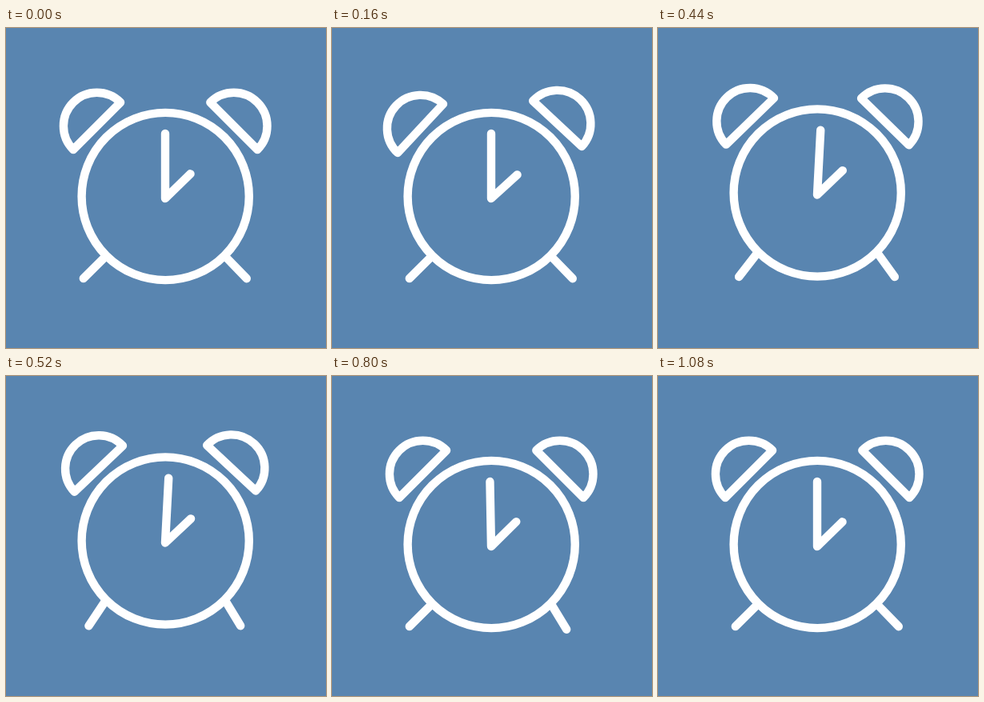
An HTML page with a canvas that plays this animation: 400 by 400 pixels, repeating every 1.16 s.

```html
<!DOCTYPE html>
<html lang="en">
<head>
<meta charset="utf-8">
<title>Alarm clock</title>
<style>
  html, body { margin: 0; width: 100%; height: 100%; overflow: hidden; background: #5985b0; }
  canvas { display: block; width: 100vmin; height: 100vmin; }
</style>
</head>
<body>
<canvas id="stage" width="400" height="400"></canvas>
<script>
const ctx = document.getElementById("stage").getContext("2d");
const LOOP = 1160, STEP = 40, LAST = 27;
const CX = 199.2, CY = 210.5, RADIUS = 104.6, HOP = -4.5;

// Poses of each part at these steps; angles in degrees
const KEYS = [0, 4, 8, 13, 17, 23, LAST];
const POSES = {
  leftBell: [0, -2, 0, 1.4, 0, 0, 0],
  rightBell: [0, -2, 2, -2, 2, -2, 0],
  hour: [0, 2, -0.4, 1, -0.5, -0.4, 0],
  minuteLow: [0, 0, -0.5, -1, -1.5, -0.7, 0],
  leftLeg: [0, 0, 0, 1, 1, -1, 0],
  rightLeg: [0, 0, 0, 1, 1, 1, 0]
};

const rad = deg => deg * Math.PI / 180;
const mix = (a, b, k) => a + (b - a) * k;

function pose(name, step) {
  let i = 0;
  while (i < KEYS.length - 2 && step >= KEYS[i + 1]) i++;
  const k = (step - KEYS[i]) / (KEYS[i + 1] - KEYS[i]);
  const ease = (1 - Math.cos(Math.PI * k)) / 2;
  return mix(POSES[name][i], POSES[name][i + 1], ease);
}

function bell(side, angle) {
  ctx.save();
  ctx.translate(CX, CY);
  ctx.rotate(rad(angle));
  ctx.scale(side, 1);
  ctx.beginPath();
  ctx.arc(85.6, -88, 41.7, rad(-135), rad(45));
  ctx.closePath();
  ctx.stroke();
  ctx.restore();
}

function leg(x, y, rest, inner, outer, swing) {
  const end = swing < 0 ? outer : inner;
  const k = Math.abs(swing);
  ctx.beginPath();
  ctx.moveTo(x, y);
  ctx.lineTo(mix(rest[0], end[0], k), mix(rest[1], end[1], k));
  ctx.stroke();
}

function hands(minute, hour) {
  const x = 199, y = 213;
  const m = rad(minute), h = rad(45.8 + hour);
  ctx.beginPath();
  ctx.moveTo(x + 81 * Math.sin(m), y - 81 * Math.cos(m));
  ctx.lineTo(x, y);
  ctx.lineTo(x + 44 * Math.sin(h), y - 44 * Math.cos(h));
  ctx.stroke();
}

function draw(ms) {
  const step = Math.min(LAST, Math.floor((ms % LOOP) / STEP));
  // The case rattles 30 times a second
  const up = Math.floor(step * 6 / 5) % 2 === 1;
  const at = name => pose(name, step);

  ctx.fillStyle = "#5985b0";
  ctx.fillRect(0, 0, 400, 400);
  ctx.strokeStyle = "#fff";
  ctx.lineWidth = 10.4;
  ctx.lineCap = ctx.lineJoin = "round";

  ctx.save();
  ctx.translate(0, up ? HOP : 0);
  bell(-1, at("leftBell"));
  bell(1, at("rightBell"));
  leg(124, 286, [96.8, 313], [103.4, 316.8], [95, 301.5], at("leftLeg"));
  leg(274.5, 286, [300.8, 313.2], [293.2, 316.8], [303.4, 301.5], at("rightLeg"));
  ctx.beginPath();
  ctx.arc(CX, CY, RADIUS, 0, 2 * Math.PI);
  ctx.stroke();
  hands(up ? 3 : at("minuteLow"), at("hour"));
  ctx.restore();
}

const start = performance.now();
function tick() {
  draw(performance.now() - start);
  requestAnimationFrame(tick);
}
tick();
</script>
</body>
</html>
```
